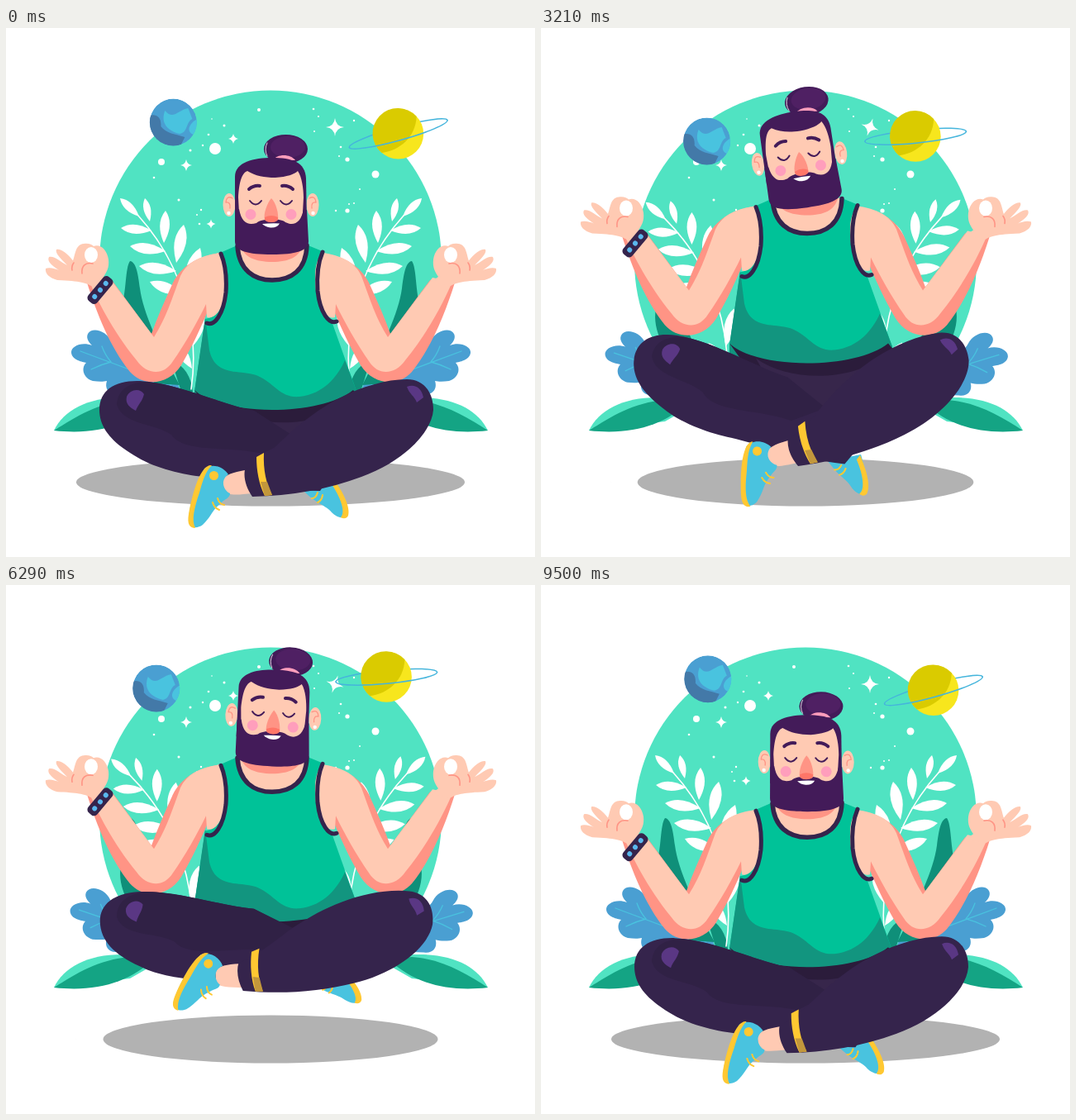
An HTML page for the animation above (9570 ms loop, 640x640 px).

```html
<!DOCTYPE html>
<html lang="en">
<head>
<meta charset="utf-8">
<title>Floating meditation</title>
<style>
  html, body { margin: 0; width: 100%; height: 100%; overflow: hidden; background: #fff; }
  svg { display: block; width: 100%; height: 100%; }
  .skin { fill: #ffcab3; } .blush { fill: #ff9485; } .hair { fill: #431b59; }
  .pants { fill: #35244c; } .sky { fill: #49c3df; } .gold { fill: #ffc832; }
  .line { fill: none; stroke-linecap: round; stroke-linejoin: round; }
</style>
</head>
<body>
<svg viewBox="0 0 640 640">
  <defs>
    <clipPath id="globe"><circle r="28.5"/></clipPath>
    <g id="fern" fill="#fff">
      <path class="line" stroke="#fff" stroke-width="1.6" d="M224 437C234 370 217 290 160 227"/>
    </g>
    <g id="blueLeaf">
      <path fill="#4a9fd2" d="M128 380C122 366 104 361 99 370C96 376 102 382 104 384C92 379 78 385 79 393C80 402 93 404 97 405C90 412 94 424 105 427C112 428 118 428 122 427C119 436 124 444 135 443L212 445C208 420 190 403 165 397C145 395 132 390 128 380Z"/>
      <path class="line" stroke="#49c3df" stroke-width="1.3" d="M90 391Q125 404 200 432M116 385Q120 396 127 404M103 413Q115 407 127 404"/>
    </g>
    <g id="groundLeaf">
      <path fill="#0f8f79" d="M150 282C158 283 160 300 162 315C166 345 185 385 210 432L180 430C150 395 134 365 139 340C146 320 144 290 150 282Z"/>
      <path fill="#0f8f79" d="M200 402C216 408 224 422 226 440L212 440Z"/>
      <path fill="#50e3c2" d="M58 487C72 458 110 441 168 449L185 456L150 476Z"/>
      <path fill="#14a484" d="M58 487C85 470 112 453 150 450L178 453C150 480 110 493 58 487Z"/>
    </g>
    <g id="arm">
      <path class="blush" d="M259 272C232 276 212 288 202 308C192 330 183 350 176 370L128 305L98 308C110 346 126 386 150 416C166 434 196 433 212 408C226 384 236 362 246 338Z"/>
      <path class="skin" d="M259 272C235 275 219 283 211 300C200 330 194 350 179 374L125 302L101 307C110 328 128 365 158 402C170 419 190 422 202 403C216 383 232 355 242 334L243 350C256 354 268 330 267 300C267 288 264 279 259 272Z"/>
      <path class="skin" d="M80 284C84 276 83 262 94 261C100 260 104 262 106 264C114 261 122 268 124 280C125 290 122 295 118 301L128 308L103 312C98 309 90 306 62 305C52 302 47 297 48 291C52 289 60 291 64 293C56 288 49 282 52 277C58 275 66 283 74 287C66 279 59 272 61 268C68 266 78 277 83 284Z"/>
      <ellipse cx="103" cy="274.500" rx="8" ry="9.500" fill="#fff"/>
      <path class="line" stroke="#ff9485" stroke-width="1.6" d="M92 297C91 288 96 283 105 285M80 293Q79 288 82 284"/>
    </g>
    <g id="armhole">
      <path class="line" stroke="#35244c" stroke-width="5" d="M260 273C266 287 267 305 266 320C263 347 252 361 243 357"/>
    </g>
  </defs>

  <circle cx="320" cy="282.500" r="207" fill="#50e3c2"/>
  <g id="stars" fill="#fff"></g>

  <g id="earth">
    <g clip-path="url(#globe)">
      <circle r="28.500" fill="#4a9fd2"/>
      <path class="sky" d="M-10 -14C0 -2 6 -15 18 -17L23 -4C15 0 18 12 8 14C-2 12 -17 4 -10 -14ZM29 -4C18 2 16 12 24 15L30 10Z"/>
      <path fill="#4379a8" d="M-30 -8C-20 -11 -14 -6 -15 5C-8 14 2 14 14 18L8 30L-20 30L-30 10Z"/>
    </g>
  </g>
  <g id="saturn">
    <path class="line ring" stroke="#45b5dc" stroke-width="1.500" d="M-61.500 0A61.500 8 0 0 1 61.500 0"/>
    <circle r="30.500" fill="#f7e61d"/>
    <path fill="#dacb00" d="M-20 23C2 20 21 4 22 -21A30.500 30.500 0 1 0 -20 23Z"/>
    <path class="line ring" stroke="#45b5dc" stroke-width="1.500" d="M-61.500 0A61.500 8 0 0 0 61.500 0"/>
  </g>

  <use href="#blueLeaf" id="blueL"/>
  <g transform="matrix(-1 0 0 1 641 0)"><use href="#blueLeaf" id="blueR"/></g>
  <use href="#groundLeaf"/>
  <use href="#groundLeaf" transform="matrix(-1 0 0 1 641 0)"/>
  <use href="#fern" id="fernL"/>
  <g transform="matrix(-1 0 0 1 641 0)"><use href="#fern" id="fernR"/></g>
  <ellipse id="shadow" cx="320" cy="549.500" ry="29" fill="#b2b2b2"/>

  <g id="man">
    <path fill="#00c298" d="M259 272L282 262L363 262L385 271C372 300 372 340 393 352L425 442L420 470L228 470L228 440L241 352C262 350 276 310 259 272Z"/>
    <path fill="#12957f" d="M241 350L246 390C254 424 285 412 305 421C325 430 332 448 355 446C385 443 402 420 410 402L425 442L420 470L228 470L228 440Z"/>
    <path class="skin" d="M280 262C282 292 300 304 322 304C345 304 362 292 363 262Z"/>
    <path class="blush" d="M284 262C286 277 302 283 322 283C342 283 356 277 359 262Z"/>
    <path class="line" stroke="#35244c" stroke-width="5.500" d="M280 264C282 293 300 305 322 305C345 305 363 293 364 263"/>
    <use href="#arm"/>
    <use href="#arm" transform="matrix(-1 0 0 1 641 0)"/>
    <use href="#armhole"/>
    <use href="#armhole" transform="matrix(-1 0 0 1 643 -2)"/>
    <g transform="translate(114 317) rotate(-50)">
      <rect x="-19" y="-7" width="38" height="14" rx="5" class="pants"/>
      <g fill="#5ab8ee"><circle cx="-10.500" r="3"/><circle r="3"/><circle cx="10.500" r="3"/></g>
    </g>

    <path fill="#2b1c3b" d="M228 438C262 470 380 470 420 438L430 450L380 525L290 525Z"/>
    <path fill="#37264b" d="M260 456C300 486 380 484 415 452L400 525L290 510Z"/>

    <g id="backLeg">
      <g id="backShoe">
        <path class="sky" d="M360 560L398 545C405 560 414 575 413 587C410 596 400 592 394 586C388 578 376 576 360 560Z"/>
        <path class="gold" d="M397 546C408 562 417 580 414 590C412 594 408 594 405 592C412 585 403 565 394 552Z"/>
        <path class="line" stroke="#ffc832" stroke-width="2" d="M370 569Q375 569 377 562M377 574Q382 572 383 565"/>
      </g>
      <path class="pants" d="M113 462C113 438 132 426 162 427C205 429 260 455 300 463L400 530L380 560C330 560 280 548 240 543C215 541 180 532 160 520C130 503 113 485 113 462Z"/>
      <path fill="#302145" d="M134 455C136 436 150 429 170 428C210 431 260 455 300 463L350 495L310 515C270 505 215 515 200 492C180 478 140 480 134 455Z"/>
      <path fill="#5a3784" d="M146 446C150 437 162 435 167 443C165 452 160 455 157 463C150 459 144 455 146 446Z"/>
    </g>

    <g id="frontLeg">
      <path class="skin" d="M262 546C268 538 280 537 294 534L298 563C280 565 268 566 264 560Z"/>
      <g id="frontShoe">
        <path class="sky" d="M240 533C250 526 263 531 269 540C258 548 264 560 271 563C271 569 264 570 260 575C250 582 248 592 238 601C230 607 220 604 221 595C222 575 230 550 240 533Z"/>
        <path class="gold" d="M249 529C236 527 226 560 221 588C219 600 222 605 229 605C224 595 228 580 234 562C238 548 241 537 249 529Z"/>
        <circle cx="251.500" cy="541.500" r="5.500" class="gold"/>
        <path class="line" stroke="#ffc832" stroke-width="2" d="M250 574Q252 581 258 583M256 569Q258 576 264 577"/>
      </g>
      <path class="pants" d="M517 462C515 490 480 525 430 543C390 558 345 566 298 567C291 557 287 545 289 534C315 520 335 497 350 484C370 468 385 457 405 447C430 434 460 425 485 425C505 425 517 440 517 462Z"/>
      <path class="gold" d="M303 519L312 514C311 535 315 552 322 565L313 566C306 552 303 535 303 519Z"/>
      <path fill="#c2973c" d="M308 549L316 549L322 565L313 566Z"/>
      <path fill="#5a3784" d="M485 434C494 430 503 435 505 447L497 453C494 445 488 443 485 434Z"/>
    </g>

    <g id="head">
      <ellipse cx="338.500" cy="146.500" rx="26.500" ry="17.500" class="hair"/>
      <ellipse cx="341" cy="144" rx="21" ry="13" fill="#4f2063"/>
      <path class="line" stroke="#fff" stroke-width=".8" d="M316 139Q312 147 316 155"/>
      <path fill="#ff9ebc" d="M323 160C328 152 344 152 350 160Z"/>
      <g id="ears">
        <ellipse cx="270" cy="214" rx="7.500" ry="14" class="skin"/>
        <ellipse cx="371" cy="214" rx="7.500" ry="14" class="skin"/>
        <path class="line" stroke="#ff9485" stroke-width="1.300" d="M274 206Q267 202 266 211Q272 210 271 218M367 206Q374 202 375 211Q369 210 370 218"/>
        <g fill="#fff"><circle cx="269.500" cy="224" r="2.200"/><circle cx="371.500" cy="224" r="2.200"/></g>
      </g>
      <path class="hair" d="M277 240L277 180C277 162 300 157 322 157C346 157 362 162 363 182L364 240Z"/>
      <path class="skin" d="M283 242L281 205C282 190 284 176 292 173C302 179 312 181 326 181C340 180 349 177 353 173C358 180 360 195 360 205L358 242Z"/>
      <path class="hair" d="M277 220L282 219C285 236 293 239 303 236C310 230 332 230 338 235C348 240 357 236 360 219L364 220L366 258C366 270 350 274 322 274C292 274 277 270 277 258Z"/>
      <path fill="#fff" d="M310 237Q320 236 331 236.500Q328 242 320 241.500Q314 241 310 237Z"/>
      <path class="blush" d="M321 206C327 212 330 225 329 232C326 235 316 235 313 232C311 225 316 212 321 206Z"/>
      <path fill="#ff7668" d="M313 229Q321 225 329 229Q330 235 321 235Q312 235 313 229Z"/>
      <g fill="#ff9ebc"><circle cx="296" cy="225.500" r="6.500"/><circle cx="345" cy="225.500" r="6.500"/></g>
      <path class="line" stroke="#431b59" stroke-width="2" d="M295 209Q302 218 309 209M332 209Q339 218 346 209"/>
      <path class="line" stroke="#431b59" stroke-width="4" d="M294 195Q300 190 307 191M334 191Q341 190 347 195"/>
    </g>
  </g>
</svg>
<script>
const LOOP = 9570;
const byId = id => document.getElementById(id);
const place = (id, value) => byId(id).setAttribute('transform', value);

// Leaves: base x, y, tip x, y
const leaf = (x, y, tx, ty) => {
  const dx = (tx - x) * .3, dy = (ty - y) * .3, mx = x + dx * 2, my = y + dy * 2;
  return `<path d="M${x} ${y}Q${mx - dy} ${my + dx} ${tx} ${ty}Q${mx + dy} ${my - dx} ${x} ${y}Z"/>`;
};
byId('fern').innerHTML += [
  [161, 228, 138, 206], [176, 245, 139, 242], [193, 270, 150, 264], [206, 294, 161, 288],
  [214, 322, 174, 307], [174, 234, 168, 206], [191, 260, 193, 221], [206, 284, 215, 238],
  [217, 315, 235, 266], [226, 385, 238, 340], [225, 412, 205, 380]
].map(p => leaf(...p)).join('');

// Stars: dots as x, y, radius; sparkles as x, y, reach
const dots = [
  [253, 146, 7], [188, 162, 4], [306, 99, 2], [447, 177, 4.5], [413, 159, 2.6], [413, 221, 2.6],
  [209, 208, 1.5], [179, 181, 1.3], [223, 148, 1.5], [264, 118, 1.5], [245, 129, 1.3], [372, 98, 1.3],
  [378, 107, 1.1], [373, 125, 1], [421, 112, 1.2], [405, 144, 1.3], [403, 155, 1], [399, 221, 1.2],
  [415, 213, 1], [421, 212, 1], [428, 195, 1], [236, 220, 1.2], [231, 226, 1], [234, 237, 1.3],
  [238, 142, 1.2], [249, 110, .8]
];
const sparkle = r => `<path d="M0 ${-r}Q1 -1 ${r} 0Q1 1 0 ${r}Q-1 1 ${-r} 0Q-1 -1 0 ${-r}Z"/>`;
byId('stars').innerHTML =
  dots.map(([x, y, r]) => `<circle cx="${x}" cy="${y}" r="${r}"/>`).join('') +
  [[275, 134, 6], [218, 166, 7], [248, 237, 5.5]]
    .map(([x, y, r]) => `<g transform="translate(${x} ${y})">${sparkle(r)}</g>`).join('') +
  `<g id="bigStar">${sparkle(11)}</g>`;

// Smooth periodic curve through poses at shared times
const TIMES = [0, 1860, 3210, 4570, 6290, 8210];
const LIFT = [0, 32, 56.5, 68.5, 54.7, 17.8];
const TILT = [0, -8, -7.8, -3, 2.8, 2];
const SWING = [0, 1, .92, .1, -.95, -.77];
const count = TIMES.length;
const timeAt = i => TIMES[(i + count) % count] + Math.floor(i / count) * LOOP;
function curve(values, t) {
  const v = i => values[(i + count) % count];
  const slope = i => (v(i + 1) - v(i - 1)) / (timeAt(i + 1) - timeAt(i - 1));
  let i = 0;
  while (t >= timeAt(i + 1)) i++;
  const span = timeAt(i + 1) - timeAt(i), u = (t - timeAt(i)) / span, w = 1 - u;
  return w * w * (1 + 2 * u) * v(i) + u * u * (3 - 2 * u) * v(i + 1)
    + span * u * w * (w * slope(i) - u * slope(i + 1));
}

const start = performance.now();
function draw() {
  const t = (performance.now() - start) % LOOP, angle = t / LOOP * 2 * Math.PI;
  const lift = curve(LIFT, t), swing = curve(SWING, t), sway = lift / 68;
  const orbit = (x, y, r, phase) =>
    `translate(${x + r * Math.cos(angle + phase)} ${y + r * Math.sin(angle + phase)})`;

  place('earth', orbit(195, 125, 13.2, -.98));
  place('saturn', orbit(463, 123.5, 12.5, .37));
  for (const ring of document.querySelectorAll('.ring'))
    ring.setAttribute('transform', `rotate(${-9 - 6.5 * Math.cos(angle)})`);
  place('bigStar', `translate(398 120) rotate(${12 * (1 - Math.cos(angle))})`);

  place('fernL', `rotate(${-3.5 * sway} 225 430)`);
  place('fernR', `rotate(${-1.4 * sway} 225 430)`);
  place('blueL', `rotate(${-2.1 * sway} 160 440)`);
  place('blueR', `rotate(${-4.3 * sway} 160 440)`);
  byId('shadow').setAttribute('rx', 214 + 21 * Math.cos(angle));

  place('man', `translate(0 ${-lift})`);
  place('head', `rotate(${curve(TILT, t)} 320 272)`);
  place('backLeg', `rotate(${6.7 * swing} 150 455)`);
  place('backShoe', `rotate(${5 * swing} 380 550)`);
  place('frontLeg', `rotate(${-6.7 * swing} 485 455)`);
  place('frontShoe', `rotate(${-7 * swing} 272 550)`);
  requestAnimationFrame(draw);
}
draw();
</script>
</body>
</html>
```
